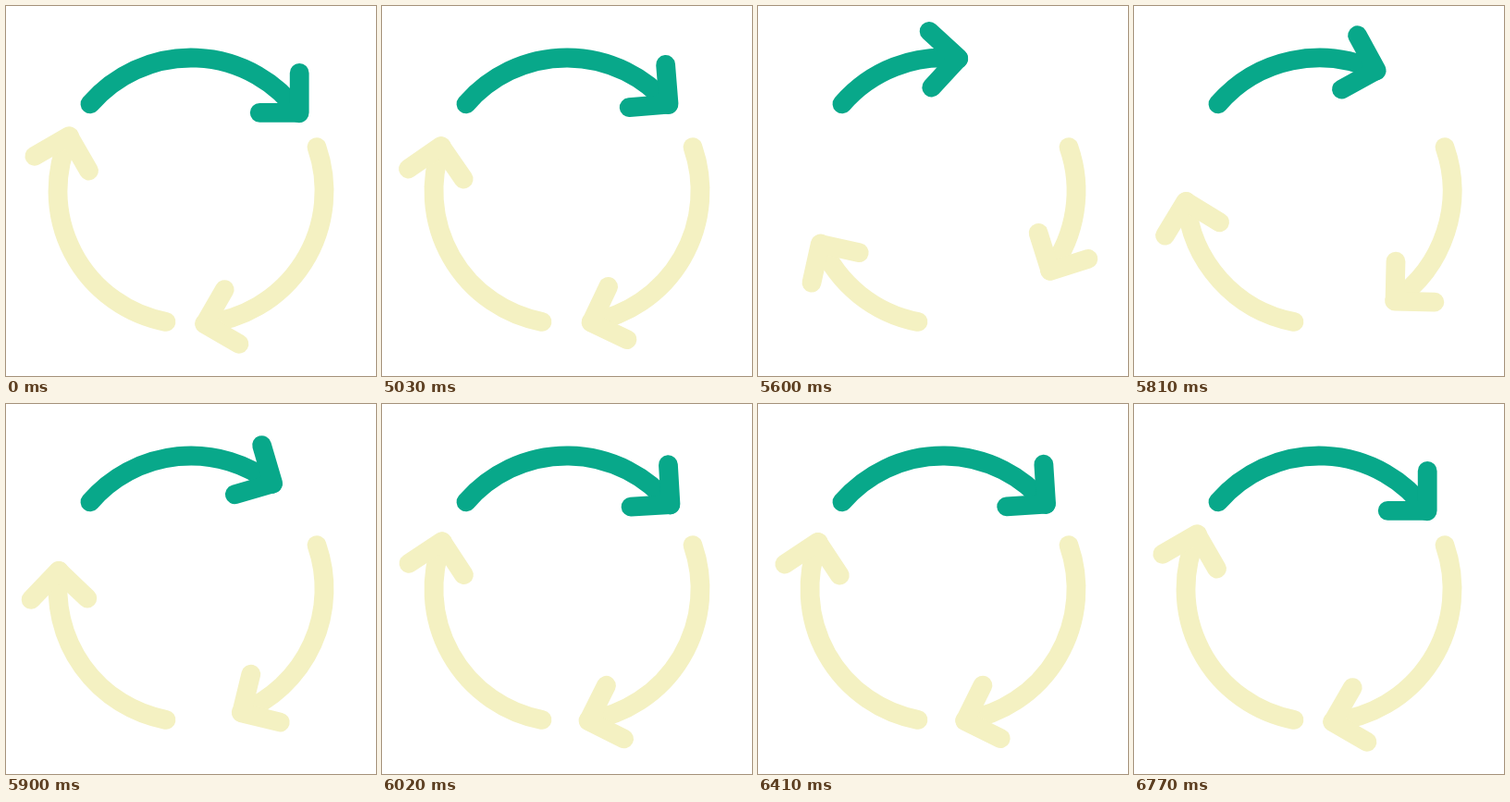
Recreate the animation shown at these times as an HTML page. Size 400 px wide and 400 px high, loop 6.83 s.

```html
<!DOCTYPE html>
<html lang="en">
<head>
<meta charset="utf-8">
<title>Cycle arrows</title>
<style>
  html, body { margin: 0; width: 100%; height: 100%; overflow: hidden; background: #fff; }
  svg { display: block; width: 100%; height: 100%; }
  path { fill: none; stroke-width: 20.8; stroke-linecap: round; stroke-linejoin: round; }
</style>
</head>
<body>
<svg id="stage" viewBox="0 0 400 400"></svg>
<script>
const NS = "http://www.w3.org/2000/svg";
const LOOP = 6830, REST = 5000, STEP = 30;
const CENTER = 200, RADIUS = 144;
const TAIL = -139.2, TIP = -35.8;
const GREEN = "#08a88a", CREAM = "#f4f1c2";

// Spring back, release, settle: [step, degrees pulled back, slope per step]
const KEYS = [
  [0, 0, 4.2], [8, 40.2, 3.2], [14, 47.2, 0.1], [19.5, 47.5, 0],
  [23, 45.3, -1.9], [27, 28.7, -5], [34, 3.4, -3.4], [37, -7.2, 0],
  [40, 1, 1.6], [44.5, 4, 0], [58, 0, 0]
];

function add(parent, name, attrs) {
  const el = document.createElementNS(NS, name);
  for (const key in attrs) el.setAttribute(key, attrs[key]);
  return parent.appendChild(el);
}

function point(deg) {
  const a = deg * Math.PI / 180;
  return (CENTER + RADIUS * Math.cos(a)).toFixed(3) + " " +
         (CENTER + RADIUS * Math.sin(a)).toFixed(3);
}

// Cubic Hermite interpolation through KEYS
function pullAt(step) {
  const i = KEYS.findIndex(key => key[0] > step);
  if (i < 0) return 0;
  const [t0, a, va] = KEYS[i - 1], [t1, b, vb] = KEYS[i];
  const span = t1 - t0, u = (step - t0) / span, w = 1 - u;
  return a * w * w * (1 + 2 * u) + b * u * u * (3 - 2 * u)
       + span * u * w * (va * w - vb * u);
}

const stage = document.getElementById("stage");
const arrows = [0, 120, 240].map(turn => {
  const group = add(stage, "g", {
    stroke: turn ? CREAM : GREEN,
    transform: `rotate(${turn} ${CENTER} ${CENTER})`
  });
  return {
    stem: add(group, "path", {}),
    head: add(group, "path", { d: "M317.2 72.4V115.3H274.2" })
  };
});

function render(ms) {
  const step = Math.max(0, Math.floor((ms - REST) / STEP + 1e-6));
  const pull = pullAt(step);
  const d = `M${point(TAIL)}A${RADIUS} ${RADIUS} 0 0 1 ${point(TIP - pull)}`;
  const spin = `rotate(${-pull} ${CENTER} ${CENTER})`;
  for (const { stem, head } of arrows) {
    stem.setAttribute("d", d);
    head.setAttribute("transform", spin);
  }
}

const start = performance.now();
function tick() {
  render((performance.now() - start) % LOOP);
  requestAnimationFrame(tick);
}
tick();
</script>
</body>
</html>
```
